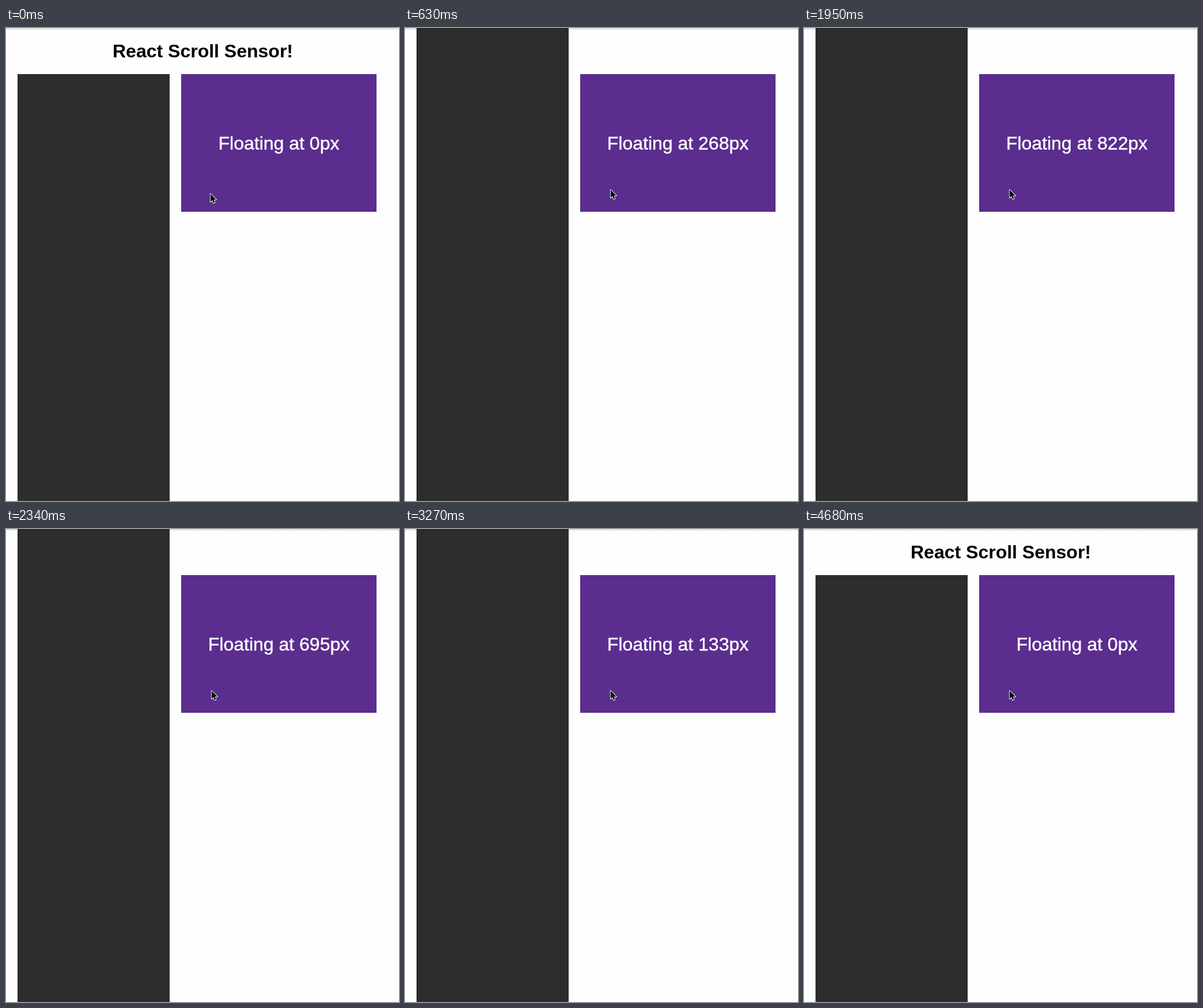
An HTML page with a canvas that plays this animation: 682 px wide and 821 px high, repeating every 4710 ms.

```html
<!DOCTYPE html>
<html lang="en">
<head>
<meta charset="utf-8">
<title>Scroll sensor</title>
<style>
  html, body { margin: 0; width: 100%; height: 100%; overflow: hidden; background: #fefefe; }
  canvas { display: block; width: 682px; height: 821px; }
</style>
</head>
<body>
<canvas id="stage" width="682" height="821"></canvas>
<script>
const W = 682, H = 821, LOOP = 4710, STEP = 30;
const ctx = document.getElementById('stage').getContext('2d');
const SANS = '"Liberation Sans", Arial, sans-serif';

// [time in ms, scroll offset in px]
const scrollKeys = [
  [60, 0], [630, 268], [1350, 805], [1680, 822],
  [1950, 822], [2760, 445], [3270, 133], [3630, 0]
];

const clamp01 = v => Math.min(1, Math.max(0, v));
const slope = (a, b) => (b[1] - a[1]) / (b[0] - a[0]);

// Monotone tangent: flat at the ends and at turning points.
function tangent(keys, i) {
  if (i === 0 || i === keys.length - 1) return 0;
  const before = slope(keys[i - 1], keys[i]);
  const after = slope(keys[i], keys[i + 1]);
  return before * after <= 0 ? 0 : 2 * before * after / (before + after);
}

function sample(keys, t) {
  if (t <= keys[0][0]) return keys[0][1];
  for (let i = 0; i < keys.length - 1; i++) {
    const [t0, v0] = keys[i], [t1, v1] = keys[i + 1];
    if (t > t1) continue;
    const d = t1 - t0, u = (t - t0) / d, w = 1 - u;
    return v0 * (1 + 2 * u) * w * w + v1 * u * u * (3 - 2 * u)
      + d * u * w * (tangent(keys, i) * w - tangent(keys, i + 1) * u);
  }
  return keys[keys.length - 1][1];
}

function drawTitle(scroll) {
  ctx.fillStyle = '#000';
  ctx.font = 'bold 32px ' + SANS;
  ctx.fillText('React Scroll Sensor!', W / 2 + 0.5, 51 - scroll);
}

function drawPanel(scroll) {
  ctx.fillStyle = '#5b2d8e';
  ctx.fillRect(304, 80, 339, 239);
  const label = `Floating at ${scroll}px`;
  ctx.font = '32px ' + SANS;
  ctx.fillStyle = ctx.strokeStyle = '#fff';
  ctx.lineWidth = 0.5;
  ctx.fillText(label, 473.5, 210.5);
  ctx.strokeText(label, 473.5, 210.5);
}

function drawTopShadow() {
  const shade = ctx.createLinearGradient(0, 0, 0, 4);
  shade.addColorStop(0, 'rgba(0,0,0,0.16)');
  shade.addColorStop(1, 'rgba(0,0,0,0)');
  ctx.fillStyle = shade;
  ctx.fillRect(0, 0, W, 4);
}

function drawPointer(x, y) {
  const arrow = new Path2D('M0 0V14L3.2 11L5.2 16L7.6 15L5.6 10.2H10Z');
  ctx.save();
  ctx.translate(x, y);
  ctx.lineJoin = 'round';
  ctx.lineWidth = 1.8;
  ctx.strokeStyle = '#fff';
  ctx.stroke(arrow);
  ctx.fillStyle = '#000';
  ctx.fill(arrow);
  ctx.restore();
}

function draw(t) {
  const scroll = Math.round(sample(scrollKeys, t));
  const move = clamp01(t / 240);
  ctx.textAlign = 'center';
  ctx.fillStyle = '#fefefe';
  ctx.fillRect(0, 0, W, H);
  drawTitle(scroll);
  const top = Math.max(0, 80 - scroll);
  ctx.fillStyle = '#2d2d2d';
  ctx.fillRect(20, top, 264, H - top);
  drawPanel(scroll);
  drawTopShadow();
  drawPointer(354.8 + 2 * move, 287.8 - 7 * move);
}

const start = performance.now();
function tick() {
  const t = (performance.now() - start) % LOOP;
  draw(Math.floor(t / STEP) * STEP);
  requestAnimationFrame(tick);
}
tick();
</script>
</body>
</html>
```
